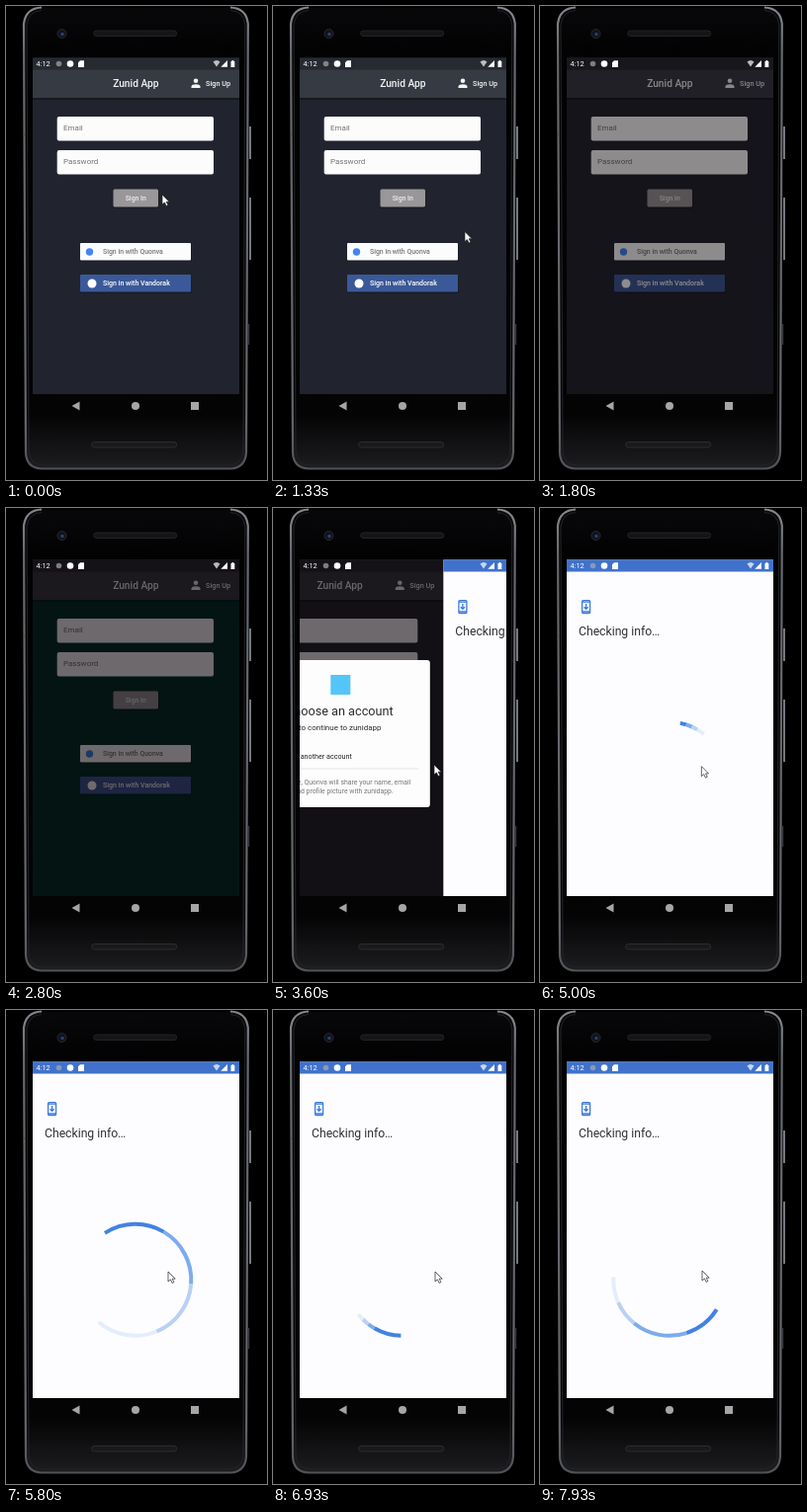
Write an HTML page that moves like this. It is 264x480 px and loops after 8 s.

```html
<!DOCTYPE html>
<html lang="en">
<head>
<meta charset="utf-8">
<title>Sign-in flow</title>
<style>
html, body { margin: 0; width: 100%; height: 100%; overflow: hidden; background: #000; }
svg { display: block; width: 100%; height: 100%; font-family: Roboto, Arial, sans-serif; }
.mid { font-weight: 500; }
.center { text-anchor: middle; }
.end { text-anchor: end; }
</style>
</head>
<body>
<svg viewBox="0 0 264 480">
  <defs>
    <linearGradient id="rim" x2="0" y2="1">
      <stop stop-color="#85888d"/><stop offset=".1" stop-color="#66696e"/>
      <stop offset=".9" stop-color="#63666b"/><stop offset="1" stop-color="#505358"/>
    </linearGradient>
    <linearGradient id="body" x2="0" y2="1">
      <stop stop-color="#08080a"/><stop offset=".1" stop-color="#020203"/>
      <stop offset=".88" stop-color="#040405"/><stop offset="1" stop-color="#1d1d20"/>
    </linearGradient>
    <clipPath id="screen"><path d="M27 52.5H236V393H27Z"/></clipPath>
  </defs>

  <!-- phone body -->
  <g fill="none">
    <path d="M36 1.500Q20 2 18 18L20 452Q20.500 468 36 468.500H227Q242 468 243 452L244.800 18Q243 2 227 1.500" fill="url(#body)" stroke="url(#rim)" stroke-width="2.200"/>
    <path d="M36 4.500Q23 5 21 19L23 450Q23.500 464 37 465H226Q239 464 240 450L241.800 19Q240 5 227 4.500" stroke="#232427"/>
    <path d="M247 122V155M247 194V257" stroke="#76797e" stroke-width="2"/>
    <path d="M245.700 322V343M17 130H20" stroke="#444649"/>
    <circle cx="56.500" cy="28" r="4.500" fill="#10131b" stroke="#262a33"/>
    <circle cx="57" cy="28.500" r="1.700" fill="#2c4171"/>
    <rect x="88.700" y="25" width="84" height="5.500" rx="2.700" fill="#151517" stroke="#222326"/>
    <rect x="86.700" y="441.500" width="86" height="5.500" rx="2.700" fill="#19191b" stroke="#2b2c2f"/>
  </g>
  <g fill="#a6a6a8">
    <path d="M66.500 405L74.500 400.500V409.500Z"/>
    <circle cx="131" cy="405" r="4"/>
    <rect x="187" y="401" width="8" height="8"/>
  </g>

  <g clip-path="url(#screen)">
    <g id="login">
      <path id="back" d="M27 52H236V393H27Z"/>
      <path d="M27 52H236V64.500H27Z" fill="#272a31"/>
      <path d="M27 93H236V95H27ZM75 242H187.500V258.800H75ZM75 274H187.500V290.800H75ZM108.500 188H154.500V204.800H108.500Z" fill-opacity=".3"/>
      <path d="M27 64.500H236V93H27Z" fill="#363a43"/>
      <g class="mid" fill="#f4f4f4">
        <text class="center" x="131.300" y="82" font-size="10.200">Zunid App</text>
        <text x="202" y="81" font-size="7.300">Sign Up</text>
        <circle cx="192" cy="75.700" r="2.300"/>
        <path d="M187.500 83V81.500Q188 79.200 192 79.200T196.500 81.500V83Z"/>
      </g>
      <g fill="#fcfcfd">
        <rect x="51.700" y="112" width="158.300" height="24.500" rx="2"/>
        <rect x="51.700" y="146" width="158.300" height="24.500" rx="2"/>
        <rect x="75" y="240" width="112" height="17.500" rx="1"/>
      </g>
      <g font-size="8" fill="#737373">
        <text x="58" y="126">Email</text>
        <text x="58" y="160">Password</text>
      </g>
      <rect x="108.500" y="185.500" width="45.500" height="18" rx="1.500" fill="#999799"/>
      <text class="mid center" x="131.300" y="197" font-size="6.900" fill="#efedef">Sign In</text>
      <circle cx="84.500" cy="249" r="3.700" fill="#4285f4"/>
      <text class="mid" x="98" y="251.300" font-size="6.900" fill="#777">Sign in with Quonva</text>
      <rect x="75" y="272" width="112" height="17.500" rx="1" fill="#3b5998"/>
      <circle cx="87" cy="281" r="4.500" fill="#fff"/>
      <text class="mid" x="98" y="283.300" font-size="7" fill="#fff">Sign in with Vandorak</text>
      <path id="dim" d="M27 52H236V393H27Z" fill="#070004"/>

      <g id="dialog">
        <rect x="41" y="154" width="181.500" height="149" rx="3" fill="#fdfdfd"/>
        <rect x="122" y="169" width="20" height="20" fill="#54c5f8"/>
        <g class="center" fill="#2b2c2f">
          <text x="131" y="209.500" font-size="12.700">Choose an account</text>
          <text x="131.500" y="225" font-size="8">to continue to zunidapp</text>
        </g>
        <circle cx="59" cy="251.500" r="4" fill="none" stroke="#666"/>
        <text class="end" x="143.500" y="254" font-size="7.200" fill="#222">Use another account</text>
        <path d="M52 264H211" stroke="#dedede" stroke-width=".8"/>
        <g class="end" font-size="6.900" fill="#777">
          <text x="203" y="279.500">To continue, Quonva will share your name, email</text>
          <text x="185.500" y="288.500">address, and profile picture with zunidapp.</text>
        </g>
      </g>
    </g>

    <g id="check">
      <path d="M27 52H236V393H27Z" fill="#fdfdff"/>
      <path d="M27 52H236V64.500H27Z" fill="#4072cc"/>
      <g fill="none" stroke="#3b78e0" stroke-width="1.300">
        <rect x="42.600" y="93.600" width="8" height="13" rx="1"/>
        <path d="M42.600 95.200H50.600M42.600 105H50.600M46.600 97V102M44.500 100.200L46.600 102.300L48.700 100.200"/>
      </g>
      <text x="39" y="129" font-size="12.200" fill="#2f3033">Checking info…</text>
      <g id="ring" fill="none" stroke-width="4"></g>
    </g>

    <!-- status icons -->
    <g fill="#fff">
      <text x="30.500" y="61.200" font-size="7.400">4:12</text>
      <circle cx="53.500" cy="58.500" r="2.800" fill="#aaa" fill-opacity=".7"/>
      <circle cx="65" cy="58.500" r="3.300"/>
      <path d="M75 55.200H79V62H73V57.200ZM224 55V61.700H217.300ZM227.500 56H228.500V55H230.300V56H231.300V62H227.500Z"/>
      <path d="M209.500 56.500Q213 53.500 216.500 56.500L213 61.500Z" fill-opacity=".7"/>
    </g>
  </g>

  <path id="cursor" d="M0 0V10L2.400 7.900L4.100 11.500L5.900 10.600L4.200 7.200H7.200Z" fill="#fff" stroke="#222" stroke-width=".7"/>
</svg>

<script>
const $ = id => document.getElementById(id);
const FPS = 15, LOOP = 8000, CX = 130.8, CY = 273.3, R = 56.5;
const shades = ['#e4edfa', '#b8d1f4', '#7dabed', '#4282e3'];

// keys: [step, value, ...]
const dimKeys = [[24, 0], [27, .45], [29, .58]];
const ringKeys = [[60, -236], [61, -72], [62, -21], [63, -18], [64, -5], [72, 60], [80, 110],
  [83, 229], [87, 483], [103, 600], [110, 800], [115, 897], [117, 951], [118, 1008], [119, 1048]];
const cursorKeys = [[0, 158, 191], [3, 161, 239], [5, 161, 239], [7, 162, 244], [19, 162, 244],
  [21, 226, 213], [47, 250, 300], [51, 163, 260], [73, 163, 260], [79, 164, 265], [105, 164, 265], [110, 164, 264]];

function at(keys, k, i = 1) {
  const n = keys.findIndex(key => key[0] >= k);
  if (n < 0) return keys[keys.length - 1][i];
  if (!n) return keys[0][i];
  const a = keys[n - 1], b = keys[n];
  return a[i] + (b[i] - a[i]) * (k - a[0]) / (b[0] - a[0]);
}

const clamp = v => Math.max(0, Math.min(1, v));
const move = (el, x, y = 0) => el.setAttribute('transform', `translate(${x} ${y})`);
const show = (el, on) => { el.style.display = on ? '' : 'none'; };

const arcs = shades.map(color => {
  const path = document.createElementNS('http://www.w3.org/2000/svg', 'path');
  path.setAttribute('stroke', color);
  return $('ring').appendChild(path);
});

function arc(from, to) {
  const point = deg => {
    const a = deg * Math.PI / 180;
    return `${CX + R * Math.cos(a)} ${CY - R * Math.sin(a)}`;
  };
  return `M${point(from)}A${R} ${R} 0 ${to - from > 180 ? 1 : 0} 0 ${point(to)}`;
}

function draw(k) {
  $('back').setAttribute('fill', k >= 28 && k < 47 ? '#003128' : '#21242e');
  $('dim').setAttribute('fill-opacity', at(dimKeys, k));

  show($('dialog'), k >= 47);
  $('dialog').setAttribute('opacity', clamp((k - 46) / 3));

  const u = clamp((k - 51.8) / 6), slide = 209 * u * u * (3 - 2 * u);
  move($('login'), -slide);
  move($('check'), 209 - slide);

  // each shade trails the next by one step
  arcs.forEach((path, i) => {
    path.setAttribute('d', arc(at(ringKeys, k - 4 + i), at(ringKeys, k - 3 + i)));
  });

  show($('cursor'), k < 22 || k >= 47);
  move($('cursor'), at(cursorKeys, k), at(cursorKeys, k, 2));
}

const start = performance.now();
function tick() {
  const t = Math.max(0, performance.now() - start) % LOOP;
  draw(Math.floor((t + 7) * FPS / 1000) % 120);
  requestAnimationFrame(tick);
}
tick();
</script>
</body>
</html>
```
